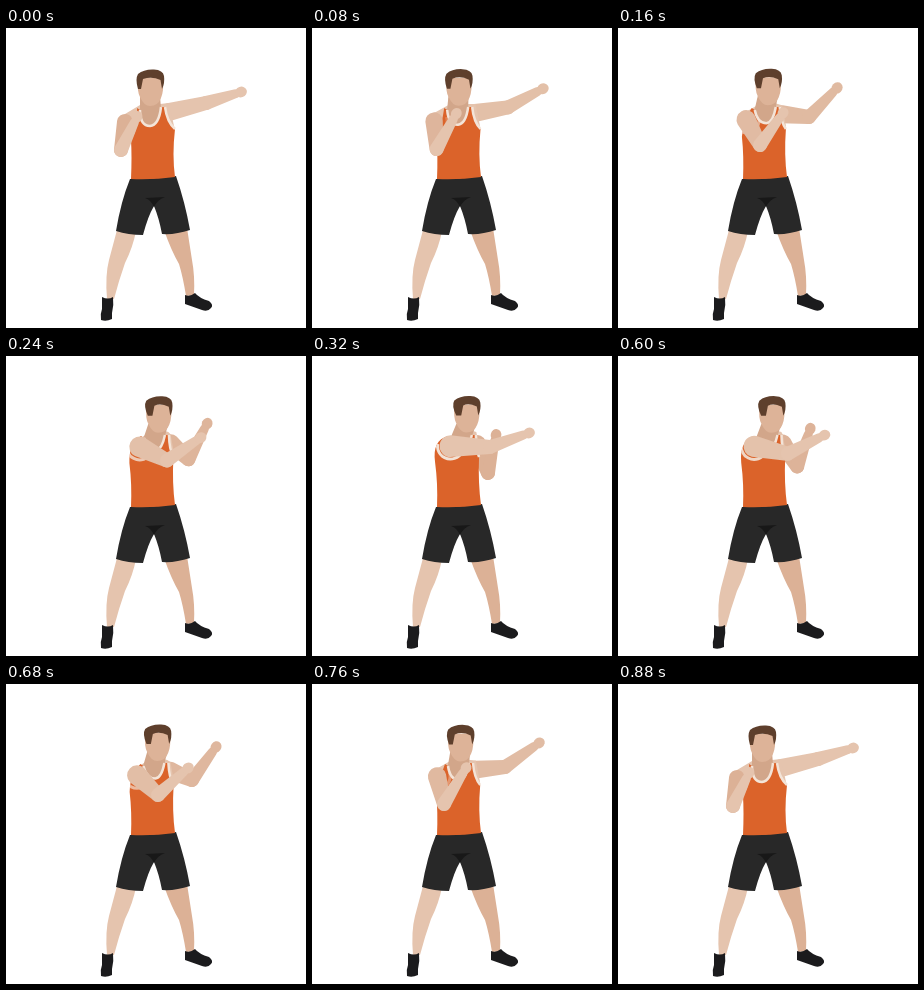
Recreate the animation shown at these times as an HTML page with a canvas. Size 300x300 px, loop 960 ms.

```html
<!DOCTYPE html>
<html lang="en">
<head>
<meta charset="utf-8">
<title>Punching exercise</title>
<style>
html, body { margin: 0; width: 100%; height: 100%; overflow: hidden; background: #fff; }
canvas { display: block; width: 300px; height: 300px; }
</style>
</head>
<body>
<canvas id="stage" width="300" height="300"></canvas>
<script>
const ctx = document.getElementById('stage').getContext('2d');
const SKIN = '#e5c4ae', TAN = '#dcb196', SHADE = '#d2a68a', FACE = '#ddb398', HAIR = '#5e3f2c';
const ORANGE = '#db632a', TRIM = '#f3e4d8', SHORTS = '#282828', FOLD = '#181818', SHOE = '#1b1b1d';
const LOOP = 960, STEP = 40, REACH = 400, MIDDLE = 440;

// Joint positions on the way from the lead punch to the rear punch.
const times = [0, 120, 160, 200, 320, 360, 400];
const tracks = {
  turn: [[0], [.4], [.55], [.68], [.98], [1], [1]],
  rearElbow: [[115, 122], [132, 120], [142, 117], [152, 111], [178, 91], [184, 83], [185, 82]],
  rearHand: [[131, 89], [154, 84], [165, 85], [182, 84], [217, 77], [222, 77], [223, 77]],
  leadElbow: [[200, 75], [193, 83], [191, 89], [186, 96], [176, 117], [173, 120], [172, 121]],
  leadHand: [[235, 64], [227, 59], [219, 60], [210, 63], [184, 79], [179, 91], [178, 93]]
};

const lerp = (a, b, p) => a + (b - a) * p;

function sample(keys, u) {
  const last = times.length - 1;
  let i = 0;
  while (i < last - 1 && u >= times[i + 1]) i++;
  const span = times[i + 1] - times[i], s = (u - times[i]) / span;
  const slope = (k, c) => k === 0 || k === last ? 0
    : (keys[k + 1][c] - keys[k - 1][c]) / (times[k + 1] - times[k - 1]);
  return keys[i].map((a, c) => {
    const d = keys[i + 1][c] - a;
    const m = slope(i, c) * span, n = slope(i + 1, c) * span;
    return a + s * (m + s * (3 * d - 2 * m - n + s * (m + n - 2 * d)));
  });
}

function blend(from, to, p) {
  const channel = (hex, i) => parseInt(hex.slice(i, i + 2), 16);
  return `rgb(${[1, 3, 5].map(i => Math.round(lerp(channel(from, i), channel(to, i), p)))})`;
}

function fill(path, color) {
  ctx.fillStyle = color;
  ctx.fill(new Path2D(path));
}

function stroke(path, color, width) {
  ctx.strokeStyle = color;
  ctx.lineWidth = width;
  ctx.stroke(new Path2D(path));
}

// Tapered capsule between two joints.
function limb([x1, y1], r1, [x2, y2], r2, color) {
  const a = Math.atan2(y2 - y1, x2 - x1);
  ctx.fillStyle = color;
  ctx.beginPath();
  ctx.arc(x1, y1, r1, a + Math.PI / 2, a - Math.PI / 2);
  ctx.arc(x2, y2, r2, a - Math.PI / 2, a + Math.PI / 2);
  ctx.fill();
}

function arm(shoulder, elbow, hand, r, upperColor, foreColor) {
  const a = Math.atan2(hand[1] - elbow[1], hand[0] - elbow[0]);
  const wrist = [hand[0] - 6 * Math.cos(a), hand[1] - 6 * Math.sin(a)];
  limb(shoulder, r, elbow, 7, upperColor);
  limb(elbow, 7, wrist, 4.5, foreColor);
  ctx.beginPath();
  ctx.ellipse(hand[0], hand[1], 6, 5.3, a, 0, 2 * Math.PI);
  ctx.fill();
}

function legs() {
  fill('M111 202L130 203Q127 219 119 235Q113 252 108 271L101 271Q99 247 103 232Z', SKIN);
  fill('M158 202L181 200Q184 219 186 232Q189 248 188 267L180 268Q177 249 173 236Q165 222 158 202Z', TAN);
  fill('M96 269Q102 272 107 269Q108 277 106 285L106 291Q100 294 95 292Q94 286 96 281Z', SHOE);
  fill('M179 267Q184 269 189 265Q193 270 203 273Q208 277 205 280Q202 284 196 282L179 276Z', SHOE);
  fill('M124 151Q148 151 170 148Q179 174 184 202Q169 207 156 206Q153 190 148 178Q142 188 137 207Q122 207 110 203Q115 173 124 151Z', SHORTS);
  fill('M139 170L159 169Q151 172 148 179Q145 172 139 170Z', FOLD);
}

function torso(p, rear, lead) {
  const mix = (a, b) => lerp(a, b, p);
  const hx = mix(0, 10.5);
  const left = mix(134, 139), right = mix(155, 160);
  const dip = mix(144, 152), depth = mix(98, 93);

  fill(`M${134 + hx} 70L${134 + hx} 77L${rear[0]} ${rear[1] - 8}L${rear[0]} 102L130 112L165 112L168 98L${lead[0]} ${lead[1] - 9}L${154 + hx} 76Z`, SKIN);
  fill(`M${134 + hx} 68L${154 + hx} 68L${right} 80L${dip + 6} ${depth}L${dip - 6} ${depth}L${left} 81Z`, SHADE);

  const neck = `M${left} 82Q${mix(134, 144)} ${depth} ${dip} ${depth}Q${mix(153, 157)} ${depth - 1} ${right} 79`;
  const armhole = `${right + 4} 79Q${mix(161, 164)} 94 ${mix(169, 167)} 101`;
  const back = `${mix(125, 123)} ${mix(112, 106)}C${mix(131, 121)} ${mix(103, 91)} ${mix(132, 125)} ${mix(95, 83)} ${left - 3} 80`;
  const shirt = `${neck}L${armhole}Q166 127 169 149Q147 152 125 151Q126 128 ${back}Z`;
  fill(shirt, ORANGE);
  stroke(neck, TRIM, 2.5);
  stroke('M' + armhole, TRIM, 2.5);

  ctx.save();
  ctx.clip(new Path2D(shirt));
  ctx.globalAlpha = p;
  ctx.strokeStyle = TRIM;
  ctx.lineWidth = 3;
  ctx.beginPath();
  ctx.arc(rear[0], rear[1], 13, -.1 * Math.PI, 1.05 * Math.PI);
  ctx.stroke();
  ctx.restore();
}

function head(p) {
  ctx.save();
  ctx.translate(145 + 10.5 * p, -1.5 * p);
  fill('M-13 50Q-14 64 -11 69Q-7 78 -1 78Q7 78 10 70Q13 63 12 50Z', FACE);
  const side = 4 * p;
  fill(`M${-13 + side / 2} 61Q-16 51 -13 46Q-7 41 3 41.5Q12 42 13 48Q14 55 11 61L9.5 52Q1 48 ${-8 + side} 51L${-10 + side} 61Z`, HAIR);
  ctx.restore();
}

function draw(now) {
  const t = Math.floor((now % LOOP) / STEP) * STEP;
  const u = Math.max(0, Math.min(REACH, MIDDLE - Math.abs(t - MIDDLE)));
  const pose = {};
  for (const name in tracks) pose[name] = sample(tracks[name], u);
  const p = pose.turn[0];
  const rear = [119 + 20 * p ** 1.3, 94 - 4 * p];
  const lead = [163 + 2 * p, 84 + 4 * p];

  ctx.fillStyle = '#fff';
  ctx.fillRect(0, 0, 300, 300);
  legs();
  const leadColor = blend(SKIN, TAN, p);
  arm(lead, pose.leadElbow, pose.leadHand, 9, leadColor, leadColor);
  torso(p, rear, lead);
  head(p);
  arm(rear, pose.rearElbow, pose.rearHand, 8 + 3 * p, blend(TAN, SKIN, p), SKIN);
  requestAnimationFrame(draw);
}
requestAnimationFrame(draw);
</script>
</body>
</html>
```
